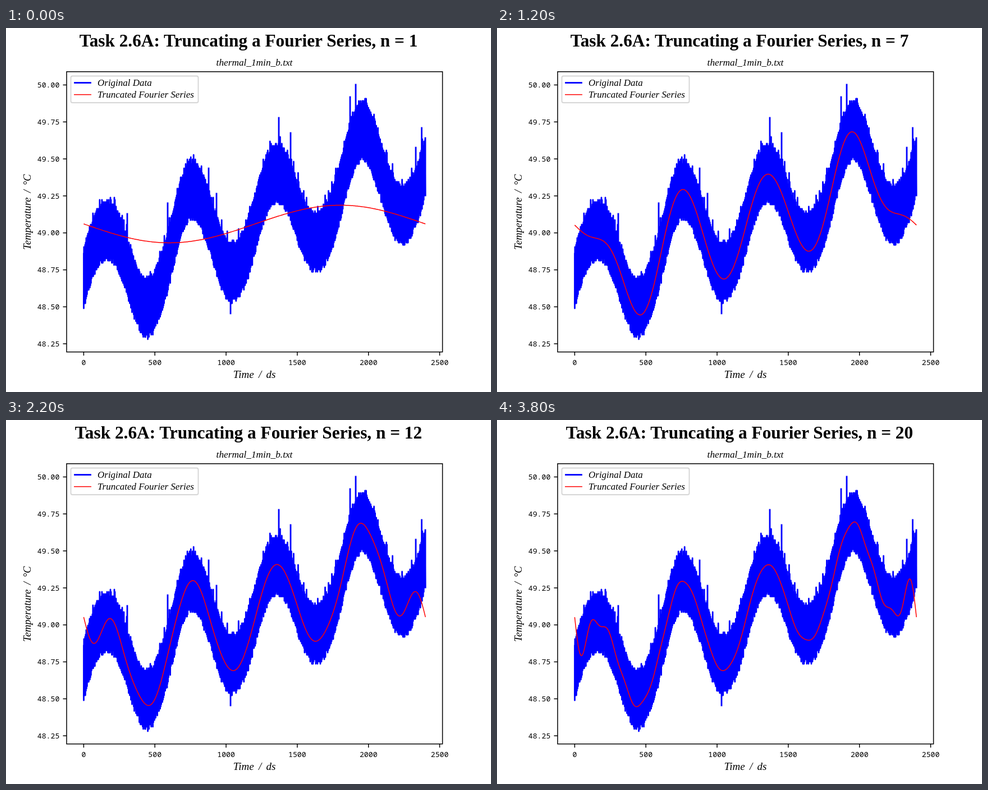
Write an HTML page that moves like this. It is 864 px wide and 648 px high and loops after 4 s.

```html
<!DOCTYPE html>
<html lang="en">
<head>
<meta charset="utf-8">
<title>Truncating a Fourier Series</title>
<style>
  html, body { margin: 0; width: 100%; height: 100%; overflow: hidden; background: #fff; }
  svg { display: block; width: 864px; height: 648px; }
  text { font-family: "Liberation Serif", "Times New Roman", serif; fill: #000; }
  .title { font-size: 31.3px; font-weight: bold; }
  .it { font-style: italic; }
  .label { font-style: italic; word-spacing: 3.5px; }
  .tick { font: 13.2px "Noto Sans Mono", "DejaVu Sans Mono", monospace; }
  .mid { text-anchor: middle; }
  .end { text-anchor: end; }
  .axis { fill: none; stroke: #000; stroke-width: 1.5; }
  .data { fill: none; stroke: #00f; stroke-width: 2.8; stroke-linejoin: round; stroke-linecap: square; }
  .fit { fill: none; stroke: #f00; stroke-width: 1.5; stroke-linejoin: round; }
</style>
</head>
<body>
<svg viewBox="0 0 864 648">
  <text class="title mid" id="title" x="432" y="33"></text>
  <text class="it mid" x="442.5" y="66.5" font-size="17.3">thermal_1min_b.txt</text>
  <path class="data" id="data"/>
  <path class="fit" id="fit"/>
  <g id="axes"><rect class="axis" x="108" y="77.8" width="669.6" height="498.9"/></g>
  <rect x="115.5" y="85.5" width="227" height="47.5" rx="3" fill="#fff" fill-opacity=".8" stroke="#ccc" stroke-opacity=".8" stroke-width="1.9"/>
  <path class="data" d="M122.5 97.5H150.5"/>
  <path class="fit" d="M121 118.6H152"/>
  <text class="it" x="163" y="103" font-size="17">Original Data</text>
  <text class="it" x="163" y="124" font-size="17">Truncated Fourier Series</text>
  <text class="label mid" x="442.5" y="622.5" font-size="19">Time / ds</text>
  <text class="label mid" transform="translate(44 327.5) rotate(-90)" font-size="18.5">Temperature / °C</text>
</svg>
<script>
const X0 = 138.4, W = 608.8, TAU = 2 * Math.PI;
const $ = id => document.getElementById(id);
const wave = u => Math.sin(4 * TAU * u);

// Evenly spaced departures from "trend + sine", in px, eased between.
const drift = [-8, 5, -7, 1, 6, -13, -12, -7, 8, 13, 10, -6, 2, -7, 3, 1, 12];

// Mean signal height in px for u from 0 to 1.
function mean(u) {
  const p = u * (drift.length - 1), i = Math.min(Math.floor(p), drift.length - 2);
  const ease = (1 - Math.cos(Math.PI * (p - i))) / 2;
  return 459 - 220 * u - 90 * wave(u) + drift[i] + (drift[i + 1] - drift[i]) * ease;
}

// Fourier coefficients of the mean signal.
const M = 1200, coef = [];
for (let k = 0; k <= 20; k++) {
  let a = 0, b = 0;
  for (let i = 0; i < M; i++) {
    const u = (i + 0.5) / M, y = mean(u);
    a += y * Math.cos(k * TAU * u);
    b += y * Math.sin(k * TAU * u);
  }
  coef.push([2 * a / M, 2 * b / M]);
}

// Partial sum; the highest harmonic counts half.
function partial(u, n) {
  let y = coef[0][0] / 2;
  for (let k = 1; k <= n; k++) {
    const [a, b] = coef[k], w = k === n ? 0.5 : 1;
    y += w * (a * Math.cos(k * TAU * u) + b * Math.sin(k * TAU * u));
  }
  return y;
}

function fitPath(n) {
  let d = "";
  for (let i = 0; i <= 400; i++) {
    const u = i / 400;
    d += (i ? "L" : "M") + (X0 + u * W).toFixed(2) + " " + partial(u, n).toFixed(2);
  }
  return d;
}

// Tips of the most prominent outliers.
const spikes = [[216, 331], [288, 312], [361, 250], [375, 295], [486, 160],
  [507, 187], [613, 123], [623, 101], [730, 213], [740.5, 178], [287, 476], [400, 508]];

// Noise band: alternating upper and lower samples around the mean.
function dataPath() {
  let seed = 20;
  const rand = () => (seed = (seed * 16807) % 2147483647) / 2147483647;
  const snap = y => Math.round(y / 4) * 4 - 2;
  const steps = 1216;
  let d = "M138.5 402V499";
  for (let i = 0; i <= steps; i++) {
    const u = i / steps, r = rand();
    const off = i % 2
      ? -(50 - 6 * wave(u) + 9 * r + 16 * r ** 14)
      : 41 + 11 * r + 6 * wave(u);
    d += "L" + (X0 + u * W).toFixed(1) + " " + snap(mean(u) + off);
  }
  d += "M747 196V297";
  for (const [x, y] of spikes) d += `M${x} ${mean((x - X0) / W).toFixed(1)}V${y}`;
  return d;
}

function drawAxes() {
  let s = "";
  for (let i = 0; i < 6; i++) {
    const x = X0 + i * 126.83;
    s += `<path class="axis" d="M${x} 576.7v6.5"/><text class="tick mid" x="${x}" y="599.5">${i * 500}</text>`;
  }
  for (let i = 0; i < 8; i++) {
    const y = 562.2 - i * 65.83;
    s += `<path class="axis" d="M108 ${y}h-6.5"/><text class="tick end" x="95.3" y="${y + 4.7}">${(48.25 + i / 4).toFixed(2)}</text>`;
  }
  $("axes").insertAdjacentHTML("beforeend", s);
}

let shown = 0;
function show(n) {
  if (n === shown) return;
  shown = n;
  $("title").textContent = "Task 2.6A: Truncating a Fourier Series, n = " + n;
  $("fit").setAttribute("d", fitPath(n));
}

drawAxes();
$("data").setAttribute("d", dataPath());
show(1);

const start = performance.now();
function tick() {
  const t = (performance.now() - start) % 4000;
  show(Math.floor(t / 200) + 1);
  requestAnimationFrame(tick);
}
requestAnimationFrame(tick);
</script>
</body>
</html>
```
